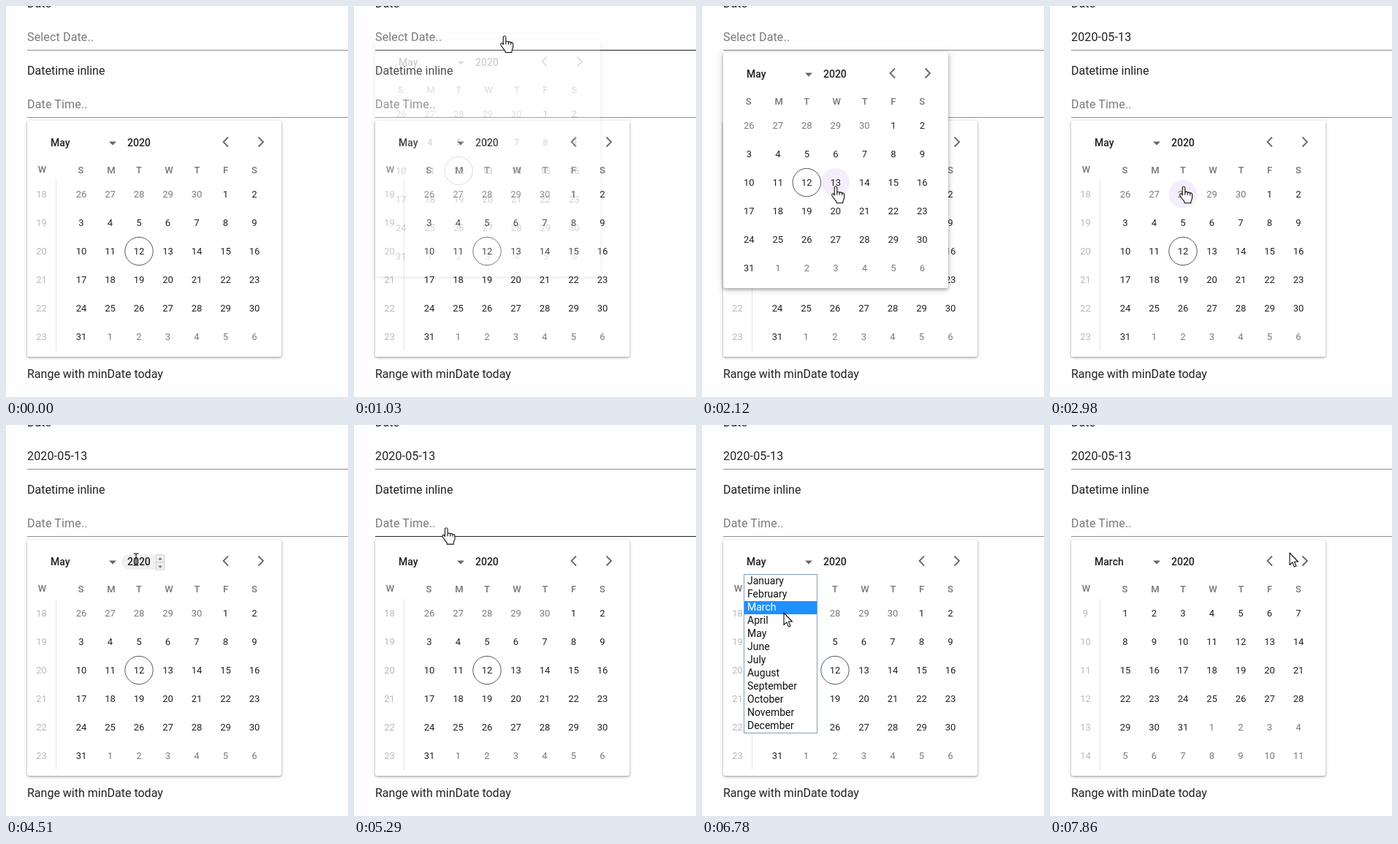
Animation, 468 px wide and 535 px high, one loop 8 s. Source, as an HTML page:

```html
<!DOCTYPE html>
<html lang="en">
<head>
<meta charset="utf-8">
<title>Date picker</title>
<style>
  html, body { margin: 0; width: 100%; height: 100%; overflow: hidden; background: #fefefe; }
  svg { display: block; width: 468px; height: 535px; font: 16px Roboto, sans-serif; fill: rgba(0,0,0,.87); }
  .hint { fill: #7a7a7a; letter-spacing: .15px; }
  .value { letter-spacing: .15px; }
  .title { font-size: 14px; font-weight: 500; }
  .day { font-size: 13px; text-anchor: middle; }
  .week { fill: #b8b8b8; }
  .head { fill: #757575; font-weight: 500; }
  .item { font-size: 14px; }
  .panel { fill: #fff; }
  .low { filter: drop-shadow(0 1px 1px rgba(0,0,0,.26)) drop-shadow(0 1px 2px rgba(0,0,0,.2)); }
  .high { filter: drop-shadow(0 2px 2px rgba(0,0,0,.26)) drop-shadow(0 1px 4px rgba(0,0,0,.2)); }
  .chevron { fill: none; stroke: #686868; stroke-width: 1.8; }
</style>
</head>
<body>
<svg id="stage" viewBox="0 0 468 535"></svg>
<script>
const LOOP = 8000, CELL_W = 39.5, CELL_H = 39;
const MONTHS = ['January', 'February', 'March', 'April', 'May', 'June', 'July',
  'August', 'September', 'October', 'November', 'December'];
const HEAD_X = [-.5, 41, 79, 120, 158.5, 197.5, 237];
const stage = document.getElementById('stage');

function add(parent, tag, attrs = {}, text) {
  const el = document.createElementNS('http://www.w3.org/2000/svg', tag);
  for (const key in attrs) el.setAttribute(key, attrs[key]);
  if (text !== undefined) el.textContent = text;
  return parent.appendChild(el);
}
const write = (parent, x, y, text, cls = '') => add(parent, 'text', { x, y, class: cls }, text);
const show = (el, on) => el.setAttribute('display', on ? 'inline' : 'none');
const move = (el, x, y) => el.setAttribute('transform', `translate(${x} ${y})`);

function makeInput(y, hint) {
  const text = write(stage, 29, y, hint, 'hint');
  const line = add(stage, 'path', { d: `M29 ${y + 12.5}H468`, 'stroke-width': 1 });
  return { text, line, y };
}

function makeCalendar({ top, width, left, weeks, shadow }) {
  const g = add(stage, 'g');
  move(g, 0, top);
  add(g, 'rect', { x: 29, y: 0, width, height: 323, rx: 3, class: 'panel ' + shadow });
  const hover = add(g, 'circle', { r: 19.5, fill: '#f4eefc' });
  const today = add(g, 'circle', { r: 19.2, fill: 'none', stroke: '#555' });

  const year = add(g, 'g');
  add(year, 'rect', { x: 158, y: 20, width: 60, height: 21, rx: 10, fill: '#f1f1f4' });
  for (const y of [20.5, 31])
    add(year, 'rect', { x: 205.5, y, width: 11, height: 10, fill: '#f2f2f2', stroke: '#d2d2d2' });
  add(year, 'path', { d: 'M208 27.5l3-3.5 3 3.5zM208 35.5l3 3.5 3-3.5z', fill: '#777' });

  const title = write(g, 61, 35, '', 'title');
  write(g, 166, 35, '2020', 'title');
  add(g, 'path', { d: 'M141 28.5h10l-5 5z', fill: '#666' });
  const end = 29 + width;
  add(g, 'path', { d: `M${end - 73} 22.5l-6.5 6.5 6.5 6.5M${end - 31.5} 22.5l6.5 6.5-6.5 6.5`, class: 'chevron' });
  HEAD_X.forEach((x, i) => write(g, left + x, 72, 'SMTWTFS'[i], 'day head'));

  const days = [], weekNos = [];
  for (let i = 0; i < 42; i++)
    days.push(write(g, left + i % 7 * CELL_W, 105.3 + (i / 7 | 0) * CELL_H, '', 'day'));
  if (weeks) {
    write(g, 49.5, 71, 'W', 'day head');
    add(g, 'path', { d: 'M68.5 81V315', stroke: '#e4e4e4' });
    for (let r = 0; r < 6; r++) weekNos.push(write(g, 48.5, 105.3 + r * CELL_H, '', 'day week'));
  }
  return { g, hover, today, year, title, days, weekNos, top, width, left, month: -1 };
}

function setMonth(cal, month) {
  if (cal.month === month) return;
  cal.month = month;
  cal.title.textContent = MONTHS[month];
  const lead = new Date(2020, month, 1).getDay();
  show(cal.today, false);
  cal.days.forEach((el, i) => {
    const date = new Date(2020, month, 1 - lead + i);
    const inside = date.getMonth() === month;
    el.textContent = date.getDate();
    el.style.fill = inside ? '' : '#7a7a7a';
    if (inside && month === 4 && date.getDate() === 12) {
      placeAt(cal, cal.today, i % 7, i / 7 | 0);
      show(cal.today, true);
    }
  });
  const first = month === 4 ? 18 : 9;
  cal.weekNos.forEach((el, r) => el.textContent = first + r);
}

function placeAt(cal, el, col, row) {
  el.setAttribute('cx', cal.left + col * CELL_W);
  el.setAttribute('cy', 100.5 + row * CELL_H);
}

// Updates hover marks inside a calendar; returns the pointer kind.
function hoverCalendar(cal, p, active) {
  const y = p.y - cal.top;
  const col = Math.round((p.x - cal.left) / CELL_W), row = Math.round((y - 100.5) / CELL_H);
  const onDay = active && col >= 0 && col < 7 && row >= 0 && row < 6;
  const inHead = active && y >= 18 && y < 42;
  const onYear = inHead && p.x >= 158 && p.x <= 218;
  if (onDay) placeAt(cal, cal.hover, col, row);
  show(cal.hover, onDay);
  show(cal.year, onYear);
  if (onYear) return 'beam';
  return onDay || (inHead && p.x >= 57 && p.x <= 155) ? 'hand' : 'arrow';
}

write(stage, 29, 2, 'Date');
write(stage, 29, 94, 'Datetime inline');
write(stage, 29, 509, 'Range with minDate today');
const dateInput = makeInput(48, 'Select Date..');
const timeInput = makeInput(140, 'Date Time..');
const inline = makeCalendar({ top: 157, width: 348, left: 103, weeks: true, shadow: 'low' });
const popup = makeCalendar({ top: 63, width: 308, left: 64.3, weeks: false, shadow: 'high' });
setMonth(popup, 4);

const list = add(stage, 'g');
add(list, 'rect', { x: 57.5, y: 204.5, width: 100, height: 217, fill: '#fff', stroke: '#7f9dc4' });
const bar = add(list, 'rect', { x: 58, width: 99, height: 18, fill: '#1e90ff' });
const items = MONTHS.map((name, i) => write(list, 62, 218 + i * 18, name, 'item'));

const pointer = add(stage, 'g', { fill: '#fff', stroke: '#111', 'stroke-width': 1.1, 'stroke-linejoin': 'round' });
const shapes = {
  hand: 'M-1.8 12V2c0-2.6 3.6-2.6 3.6 0v6.5c.3-1.8 3.4-1.6 3.5.3 .5-1.5 3.3-1.2 3.4.8 .6-1.2 2.9-.8 2.9 1.2v4.5c0 2-1.5 3-1.7 5.2v2H1v-1.6C-.8 18.4-3.5 15-5 12.4c-1-2 .9-3.4 2.2-2.2zM1.8 8.5v3.2M5.3 8.8v3M8.7 9.6v2.6',
  arrow: 'M0 0V16.5l3.8-3.6 2.6 6.2 2.6-1.1-2.6-6H11.5z',
  beam: 'M-3.5-8h2.5l1 1 1-1h2.5M0-7V7M-3.5 8h2.5l1-1 1 1h2.5'
};
for (const kind in shapes) shapes[kind] = add(pointer, 'path', { d: shapes[kind] });
shapes.beam.setAttribute('fill', 'none');

// Pointer moves: first change, last change, steps, end point.
const MOVES = [
  [70, 730, 10, 206, 41],
  [1520, 2120, 9, 183, 247],
  [3820, 4130, 5, 179, 176],
  [4360, 4510, 3, 178, 184],
  [4590, 5140, 8, 127, 156],
  [5220, 5370, 3, 126, 133],
  [5600, 6080, 7, 145, 187],
  [6630, 6780, 3, 112, 257],
  [6860, 6860, 1, 113, 261],
  [7010, 7170, 3, 112, 254],
  [7550, 7860, 5, 328, 175]
];

function pointerAt(t) {
  let x = 236, y = 560;
  for (const [from, to, steps, endX, endY] of MOVES) {
    if (t < from) break;
    const gap = (to - from) / (steps - 1) || 1;
    const done = Math.min(steps, Math.floor((t - from) / gap + .1) + 1) / steps;
    x += (endX - x) * done;
    y += (endY - y) * done;
  }
  return { x, y };
}

function drawInput(input, p, covered) {
  const over = !covered && p.x >= 29 && p.y > input.y - 20 && p.y < input.y + 13;
  input.line.setAttribute('stroke', over ? '#222' : '#8e8e8e');
  return over;
}

function draw(t) {
  const p = pointerAt(t);
  const popupOn = t >= 1030 && t < 2980, listOn = t >= 6310 && t < 7400;
  const overPopup = popupOn && p.x > 29 && p.x < 337 && p.y > 63 && p.y < 386;
  const overList = listOn && p.x > 57 && p.x < 158 && p.y > 204 && p.y < 422;
  const overInline = !overPopup && !overList && p.x > 29 && p.x < 377 && p.y > 157 && p.y < 480;

  const picked = t >= 2980;
  dateInput.text.textContent = picked ? '2020-05-13' : 'Select Date..';
  dateInput.text.setAttribute('class', picked ? 'value' : 'hint');
  const overInput = [dateInput, timeInput].map(input => drawInput(input, p, overPopup)).includes(true);

  setMonth(inline, t >= 7400 ? 2 : 4);
  const inlineKind = hoverCalendar(inline, p, overInline);
  const popupKind = hoverCalendar(popup, p, overPopup);

  show(popup.g, popupOn);
  const fade = [.2, .8, .97, 1][Math.max(0, Math.min(3, Math.floor((t - 1030) / 83)))];
  popup.g.setAttribute('opacity', fade);
  move(popup.g, 0, popup.top - 20 * (1 - fade));

  show(list, listOn);
  const row = overList ? Math.min(11, Math.floor((p.y - 205) / 18)) : 4;
  bar.setAttribute('y', 205 + row * 18);
  items.forEach((el, i) => el.style.fill = i === row ? '#fff' : '#111');

  const kind = overInput ? 'hand' : overPopup ? popupKind : overInline ? inlineKind : 'arrow';
  for (const name in shapes) show(shapes[name], name === kind);
  show(pointer, t >= 70);
  move(pointer, p.x, p.y);
}

const start = performance.now();
function tick() {
  draw((performance.now() - start) % LOOP);
  requestAnimationFrame(tick);
}
tick();
</script>
</body>
</html>
```
